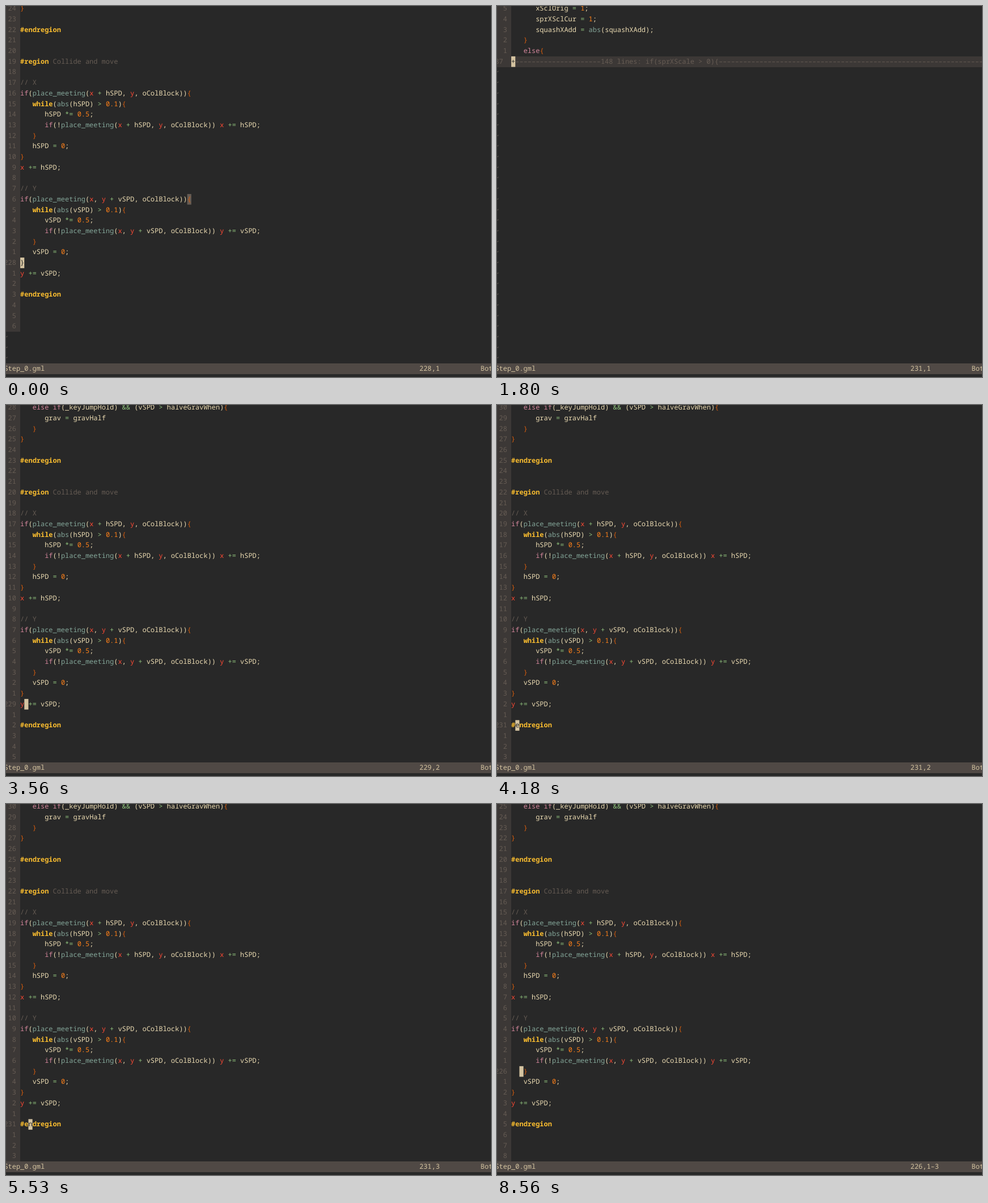
Animation of 855 by 655 pixels, one loop 8910 ms. Source, as an HTML page with a canvas:

```html
<!DOCTYPE html>
<html lang="en">
<head>
<meta charset="utf-8">
<title>Step_0.gml</title>
<style>
  html, body { margin: 0; width: 100%; height: 100%; overflow: hidden; background: #282828; }
  canvas { display: block; }
</style>
</head>
<body>
<canvas id="view" width="855" height="655"></canvas>
<script>
const ctx = document.getElementById('view').getContext('2d');
const W = 855, H = 655, LOOP = 8910;
const CELL = 7.18, ROW = 18.7, LEFT = -3.6, TOP = -4.65, BASE = 12.9;
const GUTTER = 4, LAST_ROW = 33, STATUS_ROW = 34;
const FONT = '11.967px "Noto Sans Mono", "DejaVu Sans Mono", monospace';

const C = {
  bg: '#282828', panel: '#3c3836', status: '#504945', match: '#665c54',
  dim: '#665c54', fg: '#ebdbb2', cursor: '#d5c4a1', key: '#d3869b',
  func: '#83a598', name: '#fb4934', num: '#fe8019', op: '#8ec07c',
  bold: '#fabd2f', brace: '#d65d0e'
};

// Both collision blocks share one shape.
const block = (axis, speed, args) => [
  `// ${axis.toUpperCase()}`,
  `if(place_meeting(${args}, oColBlock)){`,
  `   while(abs(${speed}) > 0.1){`,
  `      ${speed} *= 0.5;`,
  `      if(!place_meeting(${args}, oColBlock)) ${axis} += ${speed};`,
  '   }',
  `   ${speed} = 0;`,
  '}',
  `${axis} += ${speed};`,
  ''
];

const FIRST = 201;
const code = [
  '   else if(_keyJumpHold) && (vSPD > halveGravWhen){',
  '      grav = gravHalf',
  '   }',
  '}',
  '',
  '#endregion',
  '',
  '',
  '#region Collide and move',
  '',
  ...block('x', 'hSPD', 'x + hSPD, y'),
  ...block('y', 'vSPD', 'x, y + vSPD'),
  '#endregion',
  '', '', ''
];

const aboveFold = [
  '      xSclOrig = 1;',
  '      sprXSclCur = 1;',
  '      squashXAdd = abs(squashXAdd);',
  '   }',
  '   else{'
];
const FOLD_LINE = 87;
const foldText = ('+' + '–'.repeat(21) + '148 lines: if(sprXScale > 0){').padEnd(118, '–');

// Each step: start time, top line (0 = folded), cursor line, cursor column, ruler.
const steps = [
  [0, 204, 228, 0, '228,1'],
  [650, 204, 229, 0, '229,1'],
  [910, 204, 230, 0, '230,0–1'],
  [1200, 204, 231, 0, '231,1'],
  [1800, 0, 231, 0, '231,1'],
  [2710, 201, 231, 1, '231,2'],
  [3250, 201, 230, 0, '230,0–1'],
  [3560, 201, 229, 1, '229,2'],
  [3890, 201, 230, 0, '230,0–1'],
  [4180, 201, 231, 1, '231,2'],
  [4830, 0, 231, 0, '231,2–1'],
  [5530, 201, 231, 2, '231,3'],
  [6070, 201, 230, 0, '230,0–1'],
  [6230, 201, 229, 2, '229,3'],
  [6380, 201, 228, 0, '228,1'],
  [6520, 201, 227, 2, '227,1–3'],
  [6680, 201, 226, 2, '226,1–3'],
  [7660, 201, 226, -1, '226,1–3'],
  [7930, 201, 226, 2, '226,1–3'],
  [8320, 201, 226, -1, '226,1–3'],
  [8560, 201, 226, 2, '226,1–3']
];

const colX = col => LEFT + col * CELL;
const rowY = row => TOP + row * ROW;

function text(str, row, col, color, weight = 400) {
  ctx.font = `${weight} ${FONT}`;
  ctx.fillStyle = color;
  ctx.fillText(str, colX(col), rowY(row) + BASE);
}

function band(row, rows, width, color) {
  const y = Math.round(rowY(row));
  ctx.fillStyle = color;
  ctx.fillRect(0, y, width, Math.round(rowY(row + rows)) - y);
}

function cell(row, col, bg, char, color) {
  ctx.fillStyle = bg;
  ctx.fillRect(colX(col), rowY(row), CELL, ROW);
  if (char && char !== ' ') text(char, row, col, color);
}

const TOKEN = /\/\/.*|#\w+|[A-Za-z_]\w*|\d+(\.\d+)?|[{}]|[-+*=<>&]+|[^\s]/g;

function colorOf(token) {
  if (token.startsWith('//')) return C.dim;
  if (/^(#\w+|while)$/.test(token)) return C.bold;
  if (/^(if|else)$/.test(token)) return C.key;
  if (/^(place_meeting|abs)$/.test(token)) return C.func;
  if (/^[xy]$/.test(token)) return C.name;
  if (/^\d/.test(token)) return C.num;
  if (/^[{}]$/.test(token)) return C.brace;
  if (/^[-+*=<>&]/.test(token)) return C.op;
  return C.fg;
}

function drawCode(line, row) {
  const region = line.match(/^(#region)( .*)$/);
  if (region) {
    text(region[1], row, GUTTER, C.bold, 600);
    text(region[2], row, GUTTER + region[1].length, C.dim);
    return;
  }
  for (const m of line.matchAll(TOKEN)) {
    const color = colorOf(m[0]);
    text(m[0], row, GUTTER + m.index, color, color === C.bold ? 600 : 400);
  }
}

function drawNumber(row, distance, line) {
  const label = distance ? String(distance).padStart(3) : String(line);
  text(label, row, 0, C.dim);
}

function drawTildes(from) {
  for (let row = from; row <= LAST_ROW; row++) text('~', row, 0, C.dim);
}

function drawFolded() {
  const count = aboveFold.length;
  band(0, count, 25, C.panel);
  band(count, 1, W, C.panel);
  aboveFold.forEach((line, row) => {
    drawNumber(row, count - row);
    drawCode(line, row);
  });
  drawNumber(count, 0, FOLD_LINE);
  text(foldText, count, GUTTER, C.dim);
  cell(count, GUTTER, C.cursor, '+', C.bg);
  drawTildes(count + 1);
}

function drawOpen(top, line, col) {
  const lines = code.slice(top - FIRST);
  band(0, lines.length, 25, C.panel);
  lines.forEach((str, row) => {
    drawNumber(row, Math.abs(top + row - line), line);
    drawCode(str, row);
  });
  if (line === 228) cell(222 - top, GUTTER + 41, C.match, '{', C.brace);
  if (col >= 0) cell(line - top, GUTTER + col, C.cursor, code[line - FIRST][col], C.bg);
  drawTildes(lines.length);
}

function draw([, top, line, col, ruler]) {
  ctx.fillStyle = C.bg;
  ctx.fillRect(0, 0, W, H);
  if (top) drawOpen(top, line, col);
  else drawFolded();
  band(STATUS_ROW, 1, W, C.status);
  text('Step_0.gml', STATUS_ROW, 0, C.cursor);
  text(ruler, STATUS_ROW, 102, C.cursor);
  text('Bot', STATUS_ROW, 117, C.cursor);
}

ctx.textBaseline = 'alphabetic';
ctx.textRendering = 'geometricPrecision';
ctx.fontKerning = 'none';

const start = performance.now();
let shown = null;

function tick() {
  const t = (performance.now() - start) % LOOP;
  const step = steps.findLast(s => s[0] <= t);
  if (step !== shown) draw(shown = step);
  requestAnimationFrame(tick);
}
tick();
</script>
</body>
</html>
```
